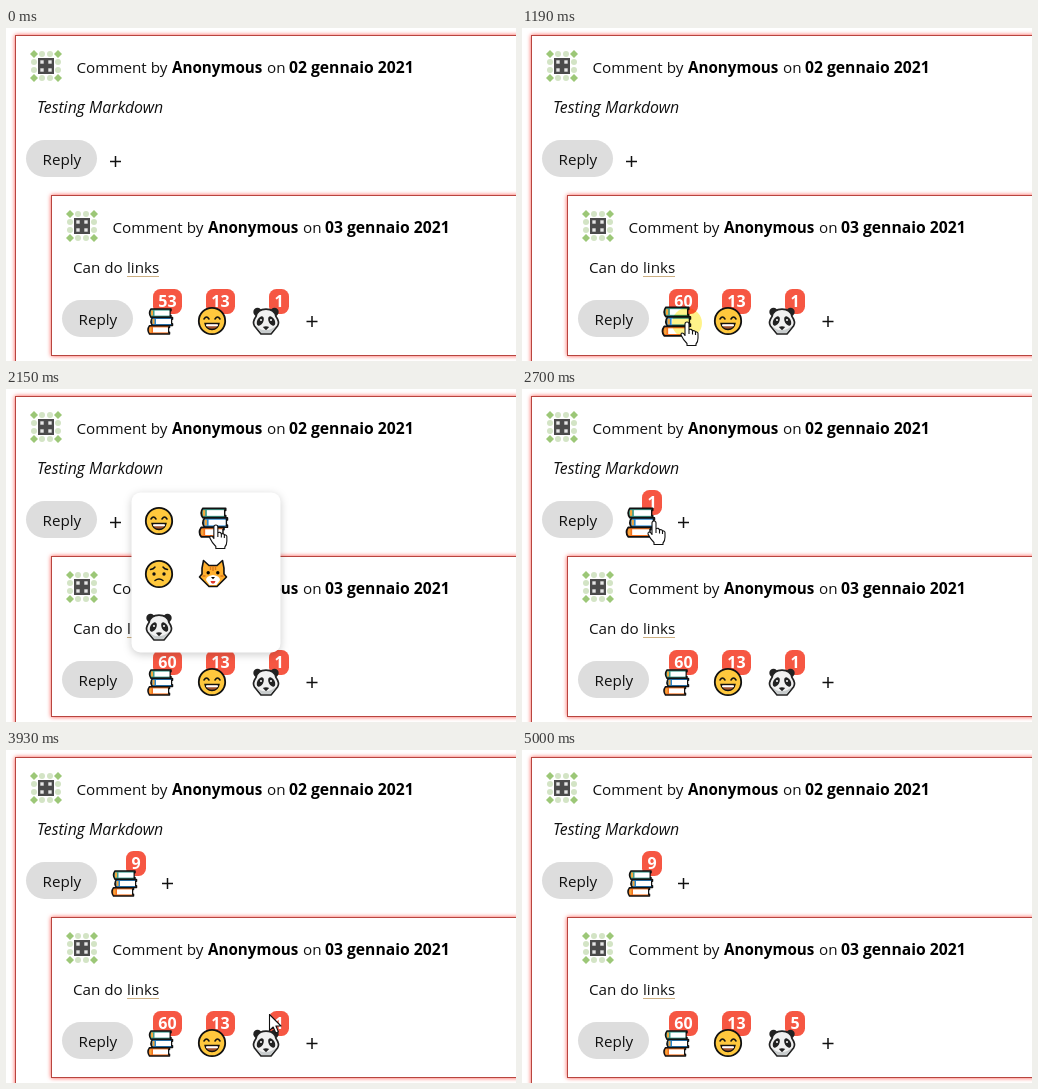
Animation of 510x333 px, one loop 5.1 s. Source, as an HTML page:

```html
<!DOCTYPE html>
<html lang="en">
<head>
<meta charset="utf-8">
<title>Comment reactions</title>
<style>
  html, body { margin: 0; width: 100%; height: 100%; overflow: hidden; background: #fff; }
  svg { display: block; }
  text { font: 15.2px "Open Sans", "Noto Sans", sans-serif; fill: #111; }
  .bold { font-weight: 700; fill: #000; }
  .date { font-size: 15.7px; }
  .italic { font-style: italic; font-size: 15.9px; }
  .count { font-weight: 700; font-size: 16px; fill: #fff; text-anchor: middle; }
  .card { fill: #fff; stroke: #b8453f; filter: drop-shadow(0 0 2.3px rgba(255, 40, 30, .8)); }
  .badge { fill: #f65743; }
  .panel { fill: #fff; filter: drop-shadow(0 2px 4px rgba(0, 0, 0, .2)); }
  .plus { stroke: #111; stroke-width: 1.5; }
  .glow { fill: #ffe92e; mix-blend-mode: multiply; }
</style>
</head>
<body>
<svg id="stage" width="510" height="333" viewBox="0 0 510 333">
  <defs>
    <g id="avatar"></g>
    <g id="plus"><path class="plus" d="M-5.5 0H5.5M0 -5.5V5.5"/></g>
    <g id="books" stroke="#111" stroke-width="1.5" stroke-linejoin="round"></g>
    <g id="face">
      <circle r="13.2" fill="#ffc83d" stroke="#111" stroke-width="1.8"/>
    </g>
    <g id="smile" fill="none" stroke="#111" stroke-width="1.5" stroke-linecap="round">
      <use href="#face"/>
      <path d="M-8 -2q2.5 -4 5 0M3 -2q2.5 -4 5 0"/>
      <path d="M-7 2.5H7Q6 8.5 0 8.5T-7 2.5Z" fill="#a0522d" stroke-width="1.4"/>
      <path d="M-5 4.3H5" stroke="#fff" stroke-width="2"/>
    </g>
    <g id="sad" fill="none" stroke="#111" stroke-width="1.5" stroke-linecap="round">
      <use href="#face"/>
      <path d="M-8.5 -4.5q3 -.4 4.5 -2.5M8.5 -4.5q-3 -.4 -4.5 -2.5M-4 6.5q4 -3 8 0"/>
      <g fill="#111" stroke="none"><circle cx="-5" r="1.7"/><circle cx="5" r="1.7"/></g>
    </g>
    <g id="cat" stroke="#111" stroke-width="1.6" stroke-linejoin="round">
      <path d="M-9.5 -13.5L-4 -8.5H4L9.5 -13.5Q11.5 -6 11 0L13.5 3L10 6.5L4 12.5H-4L-10 6.5L-13.5 3L-11 0Q-11.5 -6 -9.5 -13.5Z" fill="#ffb02e"/>
      <path d="M0 1Q7 2 7 6L3.5 11H-3.5L-7 6Q-7 2 0 1Z" fill="#fff" stroke="none"/>
      <path d="M-2.5 -8V-4M0 -8V-3M2.5 -8V-4M-10.5 2h3M10.5 2h-3" stroke="#d9741c" stroke-width="1.4"/>
      <g stroke="none">
        <circle cx="-4.8" cy="-1.2" r="1.7"/><circle cx="4.8" cy="-1.2" r="1.7"/>
        <path d="M-2 3H2L0 5.2Z"/><path d="M-2.5 7H2.5Q2 9.8 0 9.8T-2.5 7Z" fill="#e0392b"/>
      </g>
    </g>
    <g id="panda">
      <circle cx="-8.5" cy="-9" r="4.2" fill="#222"/><circle cx="8.5" cy="-9" r="4.2" fill="#222"/>
      <path d="M0 -11.8Q8.5 -11.8 10 -4.5Q14 1 11.5 5L5 13H-5L-11.5 5Q-14 1 -10 -4.5Q-8.5 -11.8 0 -11.8Z"
        fill="#f1f1f1" stroke="#222" stroke-width="1.7" stroke-linejoin="round"/>
      <path d="M-11 4L-4.7 12H4.7L11 4Q6 9 0 9.3T-11 4Z" fill="#c8cccd"/>
      <g fill="#222">
        <ellipse cx="-5.7" rx="3" ry="5" transform="rotate(28 -5.7 0)"/>
        <ellipse cx="5.7" rx="3" ry="5" transform="rotate(-28 5.7 0)"/>
        <path d="M-3.2 6Q0 4.6 3.2 6L0 9.2Z"/>
      </g>
      <circle cx="-5" cy="-1" r="1" fill="#fff"/><circle cx="5" cy="-1" r="1" fill="#fff"/>
    </g>
  </defs>
  <g id="page"></g>
  <g id="popup">
    <rect class="panel" x="125.5" y="103.5" width="149" height="160" rx="9"/>
  </g>
  <circle id="glow" class="glow" r="15"/>
  <g id="cursor" fill="#fff" stroke="#111" stroke-width="1.1" stroke-linejoin="round">
    <path id="arrow" d="M.5 .5V16.5L4.2 13L6.8 19L9.4 17.8L6.9 12H12Z"/>
    <path id="hand" d="M-2 1a2 2 0 0 1 4 0v6a2 2 0 0 1 3.5 1a2 2 0 0 1 3 1a1.8 1.8 0 0 1 2.5 1.5v4.5q0 4 -2 6v1.5h-9v-2q-4 -4 -6 -8.5q0 -3 2.5 -1.5l1.5 2zM2 7v4M5.5 8v3.5M8.5 9v3"/>
  </g>
</svg>
<script>
const LOOP = 5100;
const $ = id => document.getElementById(id);
const add = (id, markup) => $(id).insertAdjacentHTML('beforeend', markup);
const clamp = v => Math.min(1, Math.max(0, v));
const ease = v => v * v * (3 - 2 * v);
const within = (t, [from, to]) => t >= from && t < to;
const level = (t, [from, to], fade) => ease(clamp((t - from) / fade)) - ease(clamp((t - to) / fade));

const clicks = {
  lower: [670, 750, 830, 910, 990, 1070, 1150],
  upper: [2950, 3090, 3260, 3350, 3430, 3510, 3590, 3670],
  panda: [4010, 4100, 4190, 4280],
  other: [1520, 2390]
};
const allClicks = Object.values(clicks).flat();
const hovers = {
  lower: [510, 1260], upper: [2560, 3720], panda: [3950, 4440], choice: [1960, 2420]
};
const handSpans = [[510, 1270], [1440, 1800], [1960, 2440], [2560, 3730], [3950, 4420]];
const popupSpan = [1520, 2420];
const path = [ // time, x, y of the pointer tip
  [150, 290, 336], [540, 165, 295], [1220, 165, 295], [1480, 104, 137],
  [1600, 110, 138], [1760, 110, 138], [2160, 210, 137], [2390, 210, 137],
  [2640, 132, 133], [2940, 132, 133], [3200, 129, 133], [3700, 129, 133],
  [3930, 263, 264], [4010, 268, 292], [4330, 268, 292], [4490, 310, 311], [4650, 316, 336]
];

function emoji(name, x, y, id = '') {
  return `<g transform="translate(${x} ${y})"><use href="#${name}" ${id && `id="${id}"`}/></g>`;
}

function reaction(name, x, y, count, id) {
  const wide = count > 9, width = wide ? 29 : 20, left = wide ? x - 6 : x + 3;
  return `<g id="${id}-box">
    <rect class="badge" x="${left}" y="${y - 32}" width="${width}" height="25" rx="7.5"/>
    <text class="count" id="${id}-count" x="${left + width / 2}" y="${y - 14}">${count}</text>
    ${emoji(name, x, y, id)}</g>`;
}

function comment(x, y, date, body) {
  return `<use href="#avatar" x="${x + 31}" y="${y + 31}"/>
    <text x="${x + 61.5}" y="${y + 38}">Comment by</text>
    <text class="bold" x="${x + 157}" y="${y + 38}">Anonymous</text>
    <text x="${x + 252}" y="${y + 38}">on</text>
    <text class="bold date" x="${x + 274}" y="${y + 38}">${date}</text>${body}
    <rect x="${x + 11}" y="${y + 105}" width="71" height="37" rx="18.5" fill="#ddd"/>
    <text x="${x + 27.5}" y="${y + 130}">Reply</text>`;
}

function buildSymbols() {
  for (let row = 0; row < 4; row++) for (let col = 0; col < 4; col++) {
    const x = col * 8 - 12, y = row * 8 - 12;
    const edgeX = col % 3 === 0, edgeY = row % 3 === 0;
    add('avatar', edgeX && edgeY
      ? `<path d="M${x} ${y - 4}l4 4l-4 4l-4 -4z" fill="#9cc777"/>`
      : edgeX || edgeY
        ? `<circle cx="${x}" cy="${y}" r="3" fill="#d3e4c5"/>`
        : `<path d="M${x - 4} ${y - 4}h8v8h-8z" fill="#4b4b4b"/><path d="M${x - 1.7} ${y - 1.7}h3.4v3.4h-3.4z" fill="#e6e6e6"/>`);
  }
  [[-10, -12, '#3f9f8f'], [-8.5, -3.6, '#2b88d0'], [-11.5, 4.8, '#f4711f']].forEach(([x, y, color]) =>
    add('books', `<path d="M${x + 2} ${y}h20v1.8h-1v4.6h1v1.8h-20q-3 -4 0 -8.2z" fill="${color}"/>
      <path d="M${x + 5.5} ${y + 1.6}h15v5h-15z" fill="#fff" stroke="none"/>
      <path d="M${x + 3} ${y + 1.6}v5" stroke="#f7a83c" stroke-width="2"/>`));
}

function buildPage() {
  add('page', `
    <rect class="card" x="9.5" y="7.5" width="520" height="350"/>
    ${comment(9, 7, '02 gennaio 2021', '<text class="italic" x="31" y="85">Testing Markdown</text>')}
    ${reaction('books', 117, 133, 1, 'upper')}
    <use id="upper-plus" href="#plus" y="133.5"/>
    <rect class="card" x="45.5" y="167.5" width="484" height="160"/>
    ${comment(45, 167, '03 gennaio 2021', `<text x="67" y="245">Can do</text>
      <text x="121" y="245">links</text><path d="M121 248.5h32" stroke="#cdb083"/>`)}
    ${reaction('books', 153, 293, 53, 'lower')}
    ${reaction('smile', 206, 293, 13, 'grin')}
    ${reaction('panda', 260, 293, 1, 'panda-face')}
    <use href="#plus" x="306" y="293.5"/>`);
  add('popup', emoji('smile', 153, 132) + emoji('books', 206, 133, 'choice') +
    emoji('sad', 153, 185) + emoji('cat', 207, 185) + emoji('panda', 153, 238));
}

function pointerAt(t) {
  const i = path.findIndex(p => p[0] > t);
  if (i < 1) return [-60, -60];
  const [t0, x0, y0] = path[i - 1], [t1, x1, y1] = path[i];
  const k = ease((t - t0) / (t1 - t0));
  return [x0 + (x1 - x0) * k, y0 + (y1 - y0) * k];
}

function render(t) {
  const parts = { lower: 'lower', upper: 'upper', panda: 'panda-face', choice: 'choice' };
  const initial = { lower: 53, upper: 1, panda: 1 };
  for (const key in parts) {
    $(parts[key]).setAttribute('transform', `scale(${1 + .14 * level(t, hovers[key], 120)})`);
    if (key in initial)
      $(parts[key] + '-count').textContent = initial[key] + clicks[key].filter(c => c <= t).length;
  }

  const reacted = t >= popupSpan[1];
  $('upper-box').style.display = reacted ? '' : 'none';
  $('upper-plus').setAttribute('x', reacted ? 161.5 : 109.5);
  $('popup').style.opacity = level(t, popupSpan, 110);

  const at = `translate(${pointerAt(t).join(' ')})`;
  const isHand = handSpans.some(span => within(t, span));
  $('cursor').setAttribute('transform', at);
  $('hand').style.display = isHand ? '' : 'none';
  $('arrow').style.display = isHand ? 'none' : '';

  const age = t - Math.max(-LOOP, ...allClicks.filter(c => c <= t));
  $('glow').setAttribute('transform', at);
  $('glow').style.opacity = .8 * clamp(1 - age / 140);
}

buildSymbols();
buildPage();
const start = performance.now();
function tick() {
  render((performance.now() - start) % LOOP);
  requestAnimationFrame(tick);
}
tick();
</script>
</body>
</html>
```
